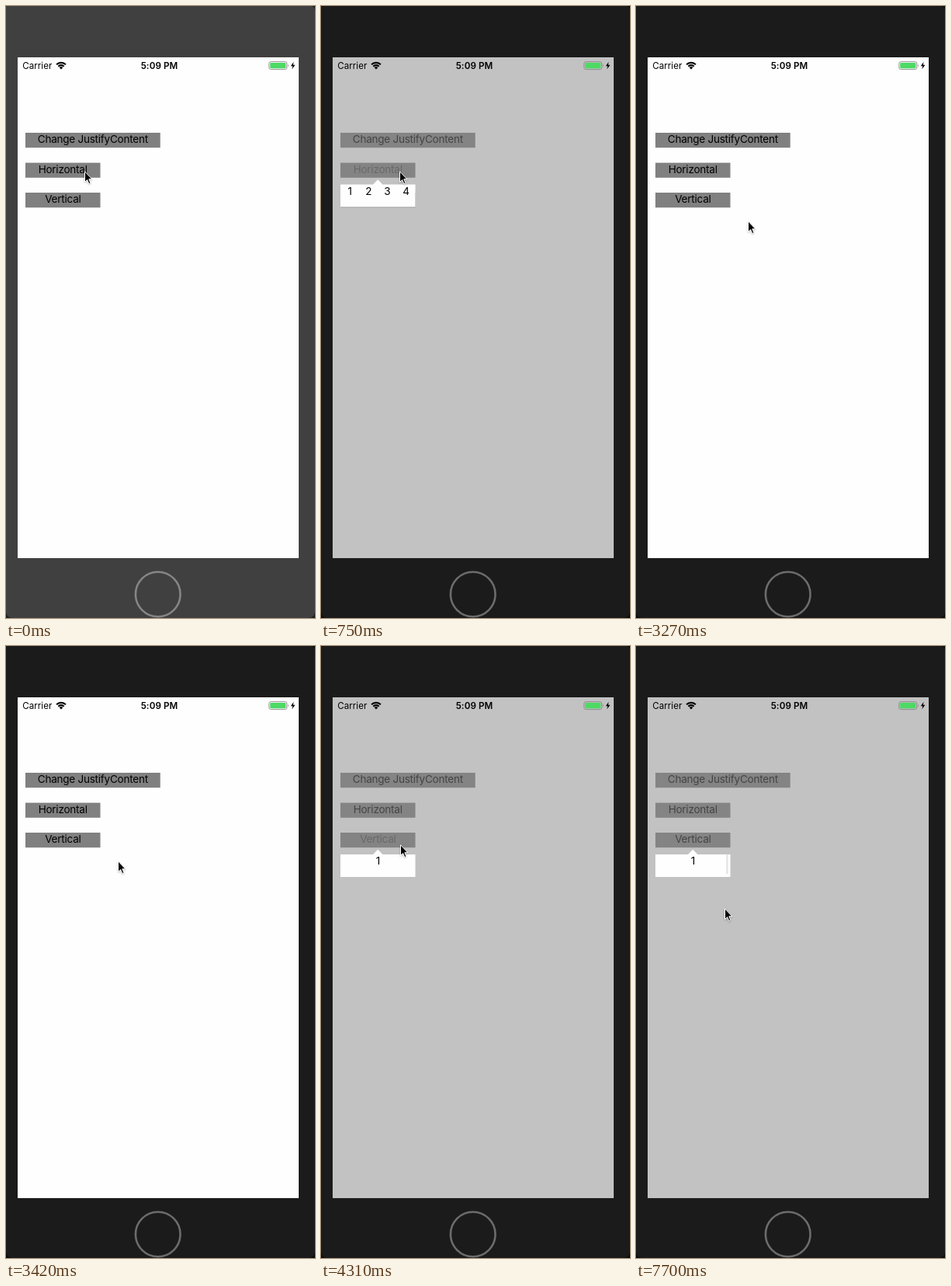
An HTML page for the animation above (8000 ms loop, 398 by 787 pixels).

```html
<!DOCTYPE html>
<html lang="en">
<head>
<meta charset="utf-8">
<title>Popover scrolling</title>
<style>
  html, body { margin: 0; width: 100%; height: 100%; overflow: hidden; background: #000; }
  svg { display: block; width: 398px; height: 787px; }
  text { font: 13.5px Inter, "Liberation Sans", sans-serif; letter-spacing: -.23px; text-anchor: middle; }
  .status { font-size: 11.6px; letter-spacing: 0; }
  .clock { font-weight: 600; letter-spacing: .1px; }
  .button { fill: #808080; }
  #cursor { filter: drop-shadow(0 1px 1px #0004); }
</style>
</head>
<body>
<svg viewBox="0 0 398 787">
  <defs>
    <clipPath id="clip"><rect x="25" width="96.5" height="29"/></clipPath>
  </defs>
  <rect id="outside" width="398" height="787"/>
  <path id="bezel" d="M0 0H393Q398 1 398 6V779Q397 787 389 787H9Q1 787 0 779Z"/>
  <circle id="home" cx="195.7" cy="756.5" r="28.8" fill="none" stroke-width="2.6"/>
  <rect x="15" y="66" width="362" height="644" fill="#fefefe"/>

  <rect class="button" x="25" y="163" width="173.7" height="19.2"/>
  <rect class="button" x="25" y="201.6" width="96.5" height="19.2"/>
  <rect class="button" x="25" y="240" width="96.5" height="19.2"/>
  <text x="111.8" y="176">Change JustifyContent</text>
  <text id="labelH" x="73.2" y="214.6">Horizontal</text>
  <text id="labelV" x="73.4" y="253">Vertical</text>

  <rect id="dim" x="15" y="66" width="362" height="644" fill="#888" fill-opacity=".5"/>

  <text class="status" x="40.3" y="80.6">Carrier</text>
  <text class="status clock" x="197.5" y="80.6">5:09 PM</text>
  <path d="M65.1 75.3A8.4 8.4 0 0 1 76.9 75.3M67.4 77.7A5 5 0 0 1 74.6 77.7" fill="none" stroke="#000" stroke-width="2.2"/>
  <path d="M71 81.4L68.8 79.2A3 3 0 0 1 73.2 79.2Z"/>
  <rect x="338.8" y="71.6" width="23" height="10" rx="2.5" fill="none" stroke="#888" stroke-width=".9"/>
  <rect x="340.2" y="73" width="20.2" height="7.2" rx="1.2" fill="#4cd964"/>
  <path d="M363 74.8Q364.8 76.6 363 78.4Z" fill="#888"/>
  <path d="M370.6 71.8L366.8 77.2H369.2L368.3 81.2L372.4 75.7H369.8Z"/>

  <g id="popover">
    <path d="M25 0H67L73.2 -6.3L79.4 0H121.5V29H25Z" fill="#fefefe"/>
    <g id="digits" clip-path="url(#clip)"></g>
    <rect id="bar" rx="1.1" fill="#9c9c9c"/>
  </g>
  <path id="cursor" d="M.5 .8V14.4L3.6 11.5L5.8 16.6L7.9 15.7L5.8 10.7H9.9Z" stroke="#fff"/>
</svg>
<script>
const $ = id => document.getElementById(id);
const set = (id, attrs) => { for (const k in attrs) $(id).setAttribute(k, attrs[k]); };

const LOOP = 8000, STEP = 148;
const OPEN_H = 5, CLOSE_H = 22, OPEN_V = 29;

// Pointer moves: start, end, and the place reached.
const moves = [
  [5, 10, 95, 238], [11, 15, 66, 236], [15, 18, 144, 276],
  [23, 28, 102, 255], [29, 33, 104, 284], [34, 38, 103, 218],
  [38, 43, 91, 278], [44, 49, 100, 357], [49, 52, 114, 337]];

function ease(n, from, to) {
  const p = Math.min(1, Math.max(0, (n - from) / (to - from)));
  return p * p * (3 - 2 * p);
}
const pulse = (n, from, to) => ease(n, from - 1, from) - ease(n, to, to + 3);
const pressed = (n, from) => n < from ? 1 : .42 + .58 * ease(n, from, from + 3);

function pointer(n) {
  let x = 101, y = 212;
  for (const [from, to, toX, toY] of moves) {
    const p = ease(n, from, to);
    x += (toX - x) * p;
    y += (toY - y) * p;
  }
  return [x, y];
}

for (let i = 1; i <= 5; i++) {
  const digit = document.createElementNS("http://www.w3.org/2000/svg", "text");
  digit.textContent = i;
  $("digits").append(digit);
}

function drawPopover(n) {
  const vertical = n >= OPEN_V;
  // Sideways the list overshoots its end by two pixels and springs back.
  const off = vertical
    ? 116 * (ease(n, 34, 40) - ease(n, 44, 50))
    : 26 * ease(n, 11, 15) - 2 * ease(n, 15, 17);
  [...$("digits").children].forEach((digit, i) => {
    digit.setAttribute("x", vertical ? 73.4 : 37.2 + 24.1 * i - off);
    digit.setAttribute("y", 13 + (vertical ? 29 * i - off : 0));
  });

  const left = 28 + off * .8;
  set("bar", vertical
    ? { x: 116.2, y: 0, width: 2.4, height: 25.4 }
    : { x: left, y: 23.6, width: Math.min(71, 118.5 - left), height: 2.2 });
  set("bar", { opacity: pulse(n, 12, 15) + pulse(n, 35, 40) + pulse(n, 45, 50) });
  set("popover", { transform: `translate(0 ${vertical ? 268 : 229.5})` });
}

function draw(now) {
  const n = Math.floor(now % LOOP / STEP);
  const open = n >= OPEN_H && n < CLOSE_H || n >= OPEN_V;
  const visibility = open ? "visible" : "hidden";

  set("outside", { fill: n ? "#0c0c0c" : "#202020" });
  set("bezel", { fill: n ? "#1b1b1b" : "#404040" });
  set("home", { stroke: n ? "#6c6c6c" : "#858585" });
  set("labelH", { opacity: pressed(n, OPEN_H) });
  set("labelV", { opacity: pressed(n, OPEN_V) });
  set("dim", { visibility });
  set("popover", { visibility });
  drawPopover(n);
  set("cursor", { transform: `translate(${pointer(n)})` });
}

const start = performance.now();
function tick() {
  draw(performance.now() - start);
  requestAnimationFrame(tick);
}
tick();
</script>
</body>
</html>
```
